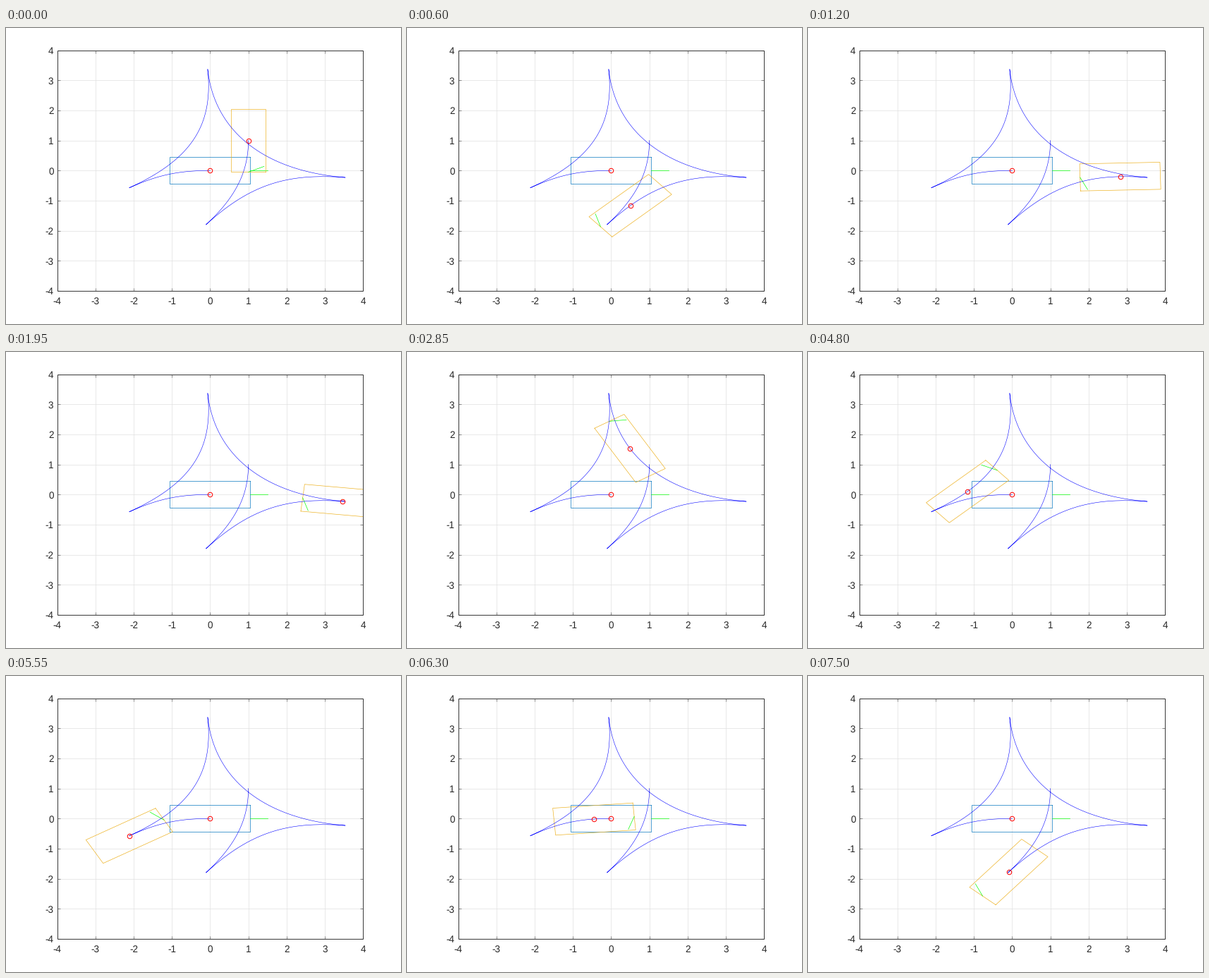
Write a matplotlib script that moves like this. It is 560 px wide and 420 px high and loops after 7650 ms.

```python
import numpy as np
import matplotlib.pyplot as plt
from matplotlib.animation import FuncAnimation

W, H, DPI = 560, 420, 100
PT = 72 / DPI                      # points per pixel
THIN = 0.67 * PT
LEFT, RIGHT, TOP, BOTTOM = 72.55, 506.3, 31.55, 372.98   # plot box in pixels
LENGTH, WIDTH, ARROW = 2.1, 0.9, 0.45
YELLOW, BLUE, INK = "#edb120", "#0072bd", "#262626"
plt.rcParams["text.hinting"] = "none"

# Points where the car changes direction: x, y, heading in degrees
CUSPS = [(1, 1, 270), (-0.11, -1.8, 229.3), (3.535, -0.23, 174.4),
         (-0.065, 3.37, 94.7), (-2.116, -0.575, 30), (0, 0, 0)]
HANDLES = [(1.03, 1.2), (1.8, 1.5), (2.1, 2.1), (1.8, 1.95), (0.84, 0.84)]
TIMES = [0, 8.6, 19.05, 30.95, 41.8, 49.4]
FRAMES = 51


def unit(angle):
    return np.array([np.cos(angle), np.sin(angle)])


class Arc:
    """Cubic curve between two cusps, driven forward (gear 1) or back (-1)."""

    def __init__(self, start, end, handles, gear):
        self.gear = gear
        a, b = np.array(start[:2], float), np.array(end[:2], float)
        self.points = np.array([
            a, a + gear * handles[0] * unit(np.radians(start[2])),
            b - gear * handles[1] * unit(np.radians(end[2])), b])
        self.u = np.linspace(0, 1, 200)
        self.curve = np.array([self.position(u) for u in self.u])
        steps = np.hypot(*np.diff(self.curve, axis=0).T)
        self.travel = np.concatenate([[0], np.cumsum(steps)])

    def position(self, u):
        v = 1 - u
        return np.array([v**3, 3 * u * v**2, 3 * u**2 * v, u**3]) @ self.points

    def pose(self, fraction):
        u = np.interp(fraction * self.travel[-1], self.travel, self.u)
        v = 1 - u
        slope = np.array([v**2, 2 * u * v, u**2]) @ np.diff(self.points, axis=0)
        dx, dy = self.gear * slope
        return self.position(u), np.arctan2(dy, dx)


arcs = [Arc(CUSPS[i], CUSPS[i + 1], HANDLES[i], (-1)**i) for i in range(5)]


def car_state(step):
    """Full acceleration for half of each arc, full braking for the rest."""
    i = min(np.searchsorted(TIMES, step, side="right") - 1, 4)
    tau = min((step - TIMES[i]) / (TIMES[i + 1] - TIMES[i]), 1)
    fraction = 2 * tau**2 if tau < 0.5 else 1 - 2 * (1 - tau)**2
    control = arcs[i].gear * (2 if tau < 0.5 else -2)
    return (*arcs[i].pose(fraction), control)


def car_shape(center, heading, control):
    forward, side = unit(heading), unit(heading + np.pi / 2)
    corners = [(1, 1), (1, -1), (-1, -1), (-1, 1), (1, 1)]
    body = [center + a * LENGTH / 2 * forward + b * WIDTH / 2 * side
            for a, b in corners]
    nose = center + LENGTH / 2 * forward
    return np.array(body), np.array([nose, nose + ARROW * unit(heading + control)])


fig = plt.figure(figsize=(W / DPI, H / DPI), dpi=DPI, facecolor="white")
ax = fig.add_axes([LEFT / W, 1 - BOTTOM / H, (RIGHT - LEFT) / W, (BOTTOM - TOP) / H])
ax.set(xlim=(-4, 4), ylim=(-4, 4), xticks=range(-4, 5), yticks=range(-4, 5))
ax.set_axisbelow(True)
ax.grid(color="#dfdfdf", lw=THIN)
ax.tick_params(direction="in", top=True, right=True, length=4 * PT,
               width=0.5 * PT, color=INK, labelbottom=False, labelleft=False)
for spine in ax.spines.values():
    spine.set(color=INK, linewidth=0.9 * PT, capstyle="butt")

font = dict(family="Liberation Sans", size=13.5 * PT, color=INK, va="baseline")
for value in range(-4, 5):
    part = (value + 4) / 8
    x = LEFT + part * (RIGHT - LEFT)
    y = BOTTOM - part * (BOTTOM - TOP)
    fig.text(x / W, 1 - 392 / H, str(value), ha="center", **font)
    fig.text(67.5 / W, 1 - (y + 5.3) / H, str(value), ha="right", **font)


def line(points, color, width=THIN):
    return ax.plot(*np.transpose(points), color=color, lw=width)[0]


def ring(center):
    return ax.plot(*[[c] for c in center], "o", ms=6.5 * PT, mfc="none",
                   mec="red", mew=PT)[0]


goal_body, goal_arrow = car_shape(np.zeros(2), 0, 0)
line(goal_body, BLUE)
line(goal_arrow, "lime")
body = line(goal_body, YELLOW)
arrow = line(goal_arrow, "lime")
line(np.vstack([arc.curve for arc in arcs]), "blue", 0.55 * PT)
ring((0, 0))
marker = ring((1, 1))

# Steps play in the text order of their numbers: 1, 10, 11, ... 19, 2, 20, ...
order = sorted(range(1, FRAMES + 1), key=str)


def draw(frame):
    center, heading, control = car_state(order[frame] - 1)
    for artist, points in zip((body, arrow), car_shape(center, heading, control)):
        artist.set_data(*points.T)
    marker.set_data([center[0]], [center[1]])
    return body, arrow, marker


anim = FuncAnimation(fig, draw, frames=FRAMES, interval=150, repeat=True,
                     repeat_delay=0)
plt.show()
```
